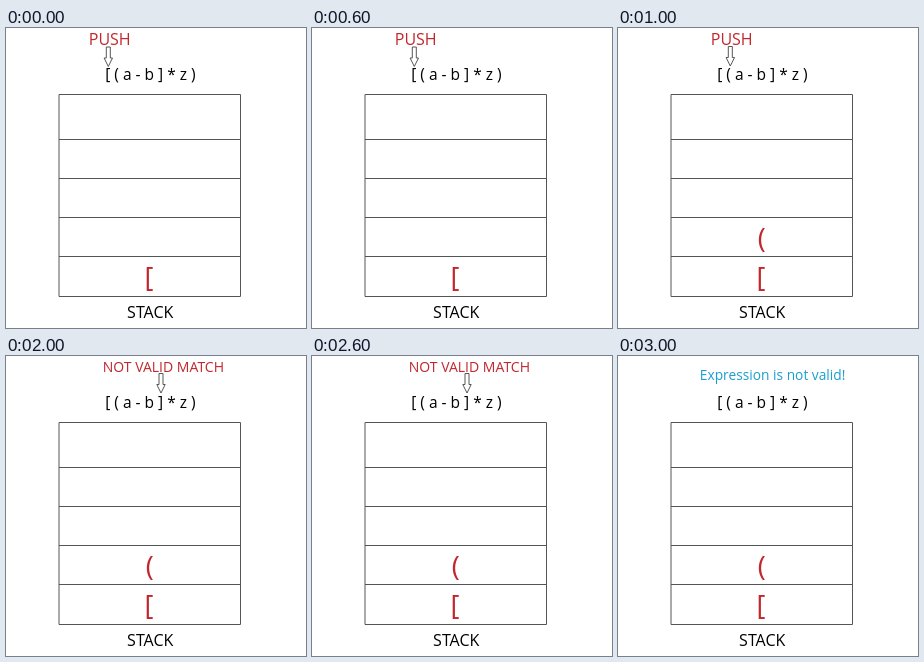
Recreate the animation shown at these times as an HTML page. Size 300 px wide and 300 px high, loop 4 s.

```html
<!DOCTYPE html>
<html lang="en">
<head>
<meta charset="utf-8">
<title>Bracket matching with a stack</title>
<style>
  html, body { margin: 0; width: 100%; height: 100%; overflow: hidden; background: #fff; }
  svg { display: block; width: 100vw; height: 100vh; }
  text { font: 16px "Open Sans", "Noto Sans", sans-serif; fill: #000; white-space: pre; }
  .line { fill: none; stroke: #555; }
  #arrow { fill: #fff; stroke: #444; stroke-width: .9; }
  .expression { font-size: 15.5px; }
  .item { font-size: 27px; fill: #c1272d; }
</style>
</head>
<body>
<svg viewBox="0 0 300 300">
  <text id="label"></text>
  <path id="arrow" d="M-2 0H2V11H4.2L0 19.5L-4.2 11H-2Z"/>
  <text class="expression" x="99.2" y="51.5">[ ( a - b ] * z )</text>
  <path class="line" d="M53 66.5H234.5V268.5H53ZM53 111.5H234.5M53 150.5H234.5M53 189.5H234.5M53 228.5H234.5"/>
  <text class="item" x="138.6" y="259">[</text>
  <text class="item" id="second" x="139.8" y="220">(</text>
  <text x="121.1" y="290">STACK</text>
</svg>
<script>
  const RED = '#c1272d', BLUE = '#1a9fd0';
  const steps = [
    { text: 'PUSH', x: 82.8, y: 17, size: 16, color: RED, arrow: [102.3, 19], depth: 1 },
    { text: 'PUSH', x: 92.8, y: 16.5, size: 16, color: RED, arrow: [112.3, 18.5], depth: 2 },
    { text: 'NOT VALID MATCH', x: 96.8, y: 15.5, size: 14, color: RED, arrow: [155, 17.5], depth: 2 },
    { text: 'Expression is not valid!', x: 81.8, y: 24, size: 13.75, color: BLUE, depth: 2 }
  ];
  const [label, arrow, second] = ['label', 'arrow', 'second'].map(id => document.getElementById(id));
  const show = (el, on) => el.setAttribute('visibility', on ? 'visible' : 'hidden');
  let current;

  function draw(step) {
    label.textContent = step.text;
    label.setAttribute('x', step.x);
    label.setAttribute('y', step.y);
    label.style.fontSize = step.size + 'px';
    label.style.fill = step.color;
    show(arrow, step.arrow);
    if (step.arrow) arrow.setAttribute('transform', `translate(${step.arrow})`);
    show(second, step.depth > 1);
  }

  function tick() {
    const step = steps[Math.floor(performance.now() / 1000) % steps.length];
    if (step !== current) draw(current = step);
    requestAnimationFrame(tick);
  }
  tick();
</script>
</body>
</html>
```
